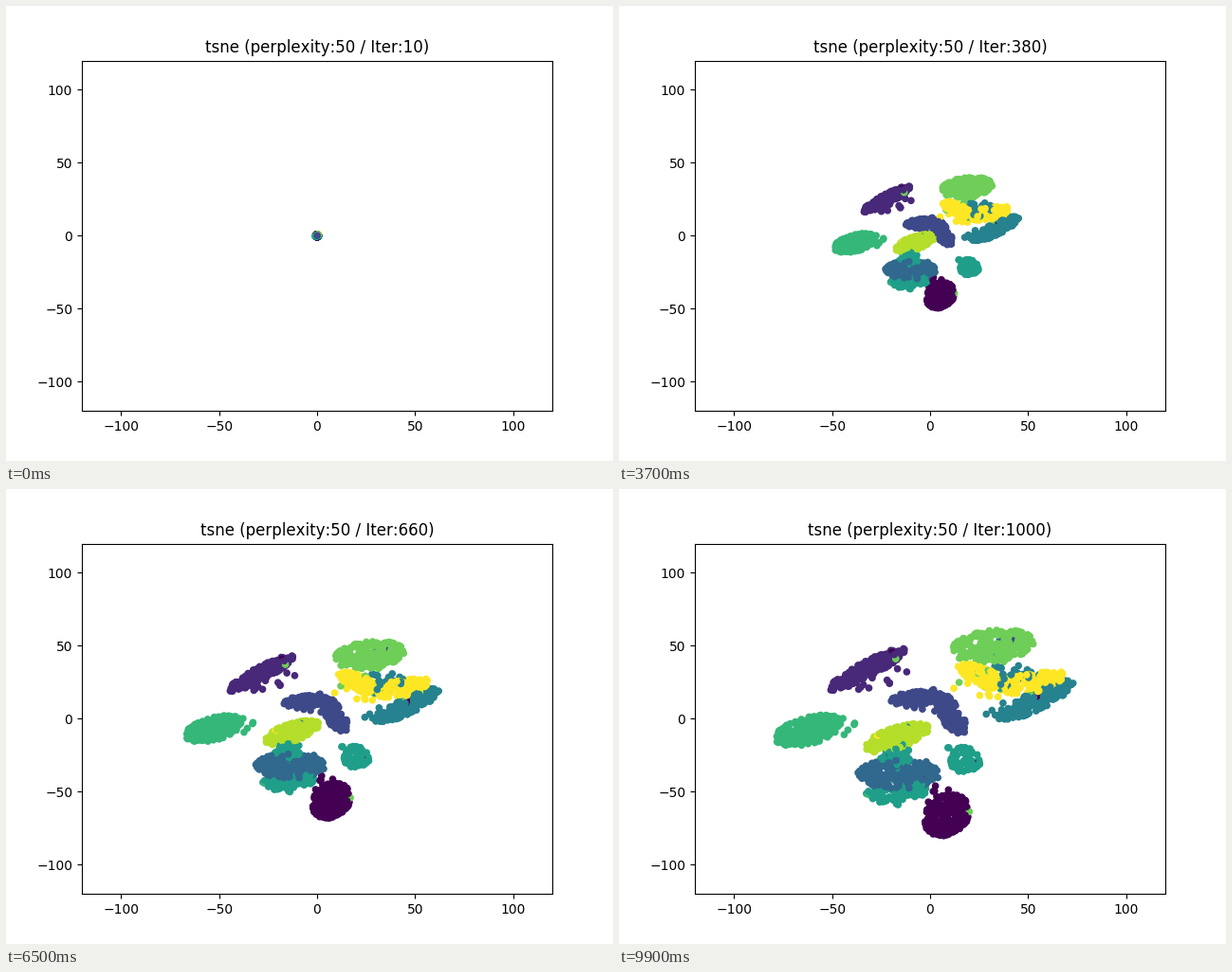
A matplotlib script for the animation above (10 s loop, 640x480 px).

```python
import numpy as np
import matplotlib.pyplot as plt
from matplotlib.animation import FuncAnimation

FRAMES = 100
STRAY = 0.05     # share of dots lagging between the clusters
MIXED = 0.01     # share of dots with another digit's colour

rng = np.random.default_rng(4)
digits, homes, drifts = [], [], []


def cluster(digit, n, centre, length, width, angle=0, drift=(0, 0)):
    """Fill a tilted ellipse, given by its half axes in data units."""
    r, a = np.sqrt(rng.random(n)), rng.uniform(0, 2 * np.pi, n)
    u, v = length * r * np.cos(a), width * r * np.sin(a)
    c, s = np.cos(np.radians(angle)), np.sin(np.radians(angle))
    digits.append(np.full(n, digit))
    homes.append(np.column_stack([u * c - v * s, u * s + v * c]) + centre)
    drifts.append(np.tile(drift, (n, 1)))


cluster(0, 250, (8.5, -66), 15, 11, 70)
cluster(1, 250, (-32, 34), 24, 5, 36, drift=(-10, 18))
cluster(2, 80, (-8, 14), 12, 5, 10)
cluster(2, 150, (9, 5), 17, 6, -62)
cluster(3, 250, (-16, -38), 21, 10)
cluster(4, 200, (55, 13), 22, 6, 35, drift=(0, -13))
cluster(4, 30, (42, 30), 15, 9)
cluster(5, 60, (18, -28), 8, 9, drift=(38, -18))
cluster(5, 60, (-18, -26), 8, 6)
cluster(5, 60, (-22, -53), 11, 6, -15)
cluster(5, 50, (-8, -49), 6, 5)
cluster(6, 250, (-62, -8), 18, 9, 22)
cluster(7, 250, (32, 50), 21, 11, 10, drift=(-4, 10))
cluster(8, 230, (-17, -13), 18, 7, 25, drift=(12, 13))
cluster(9, 110, (27, 29), 15, 6, -28, drift=(-10, 0))
cluster(9, 120, (52, 25), 19, 7, 12, drift=(-10, 0))

digit, home, drift = map(np.concatenate, (digits, homes, drifts))
count = len(digit)

stray = rng.random(count) < STRAY
home[stray] *= rng.uniform(0.6, 1, (stray.sum(), 1))
mixed = rng.random(count) < MIXED
digit[mixed] = rng.integers(0, 10, mixed.sum())

# Shuffle the drawing order, with a 2 on top
order = rng.permutation(count)
top = np.flatnonzero(digit[order] == 2)[-1]
order = np.roll(order, count - 1 - top)
digit, home, drift = digit[order], home[order], drift[order]


def layout(step):
    """A slow tight start, then growth that eases off logarithmically."""
    t = step / 1000
    s = max(0.01 + 6 * t * t if t < 0.13 else 0,
            1 + (0.44 - 0.12 * t) * np.log(t))
    return s * (home + (1 - s) * drift)


plt.rcParams["text.kerning_factor"] = 6
fig, ax = plt.subplots(figsize=(6.4, 4.8), dpi=100)
ax.set(xlim=(-120, 120), ylim=(-120, 120))
cloud = ax.scatter(*layout(10).T, s=20, c=digit, cmap="viridis")
title = ax.set_title("")


def update(i):
    step = 10 * (i + 1)
    cloud.set_offsets(layout(step))
    title.set_text(f"tsne (perplexity:50 / Iter:{step})")
    return cloud, title


anim = FuncAnimation(fig, update, frames=FRAMES, interval=100,
                     repeat=True, repeat_delay=0)
plt.show()
```
